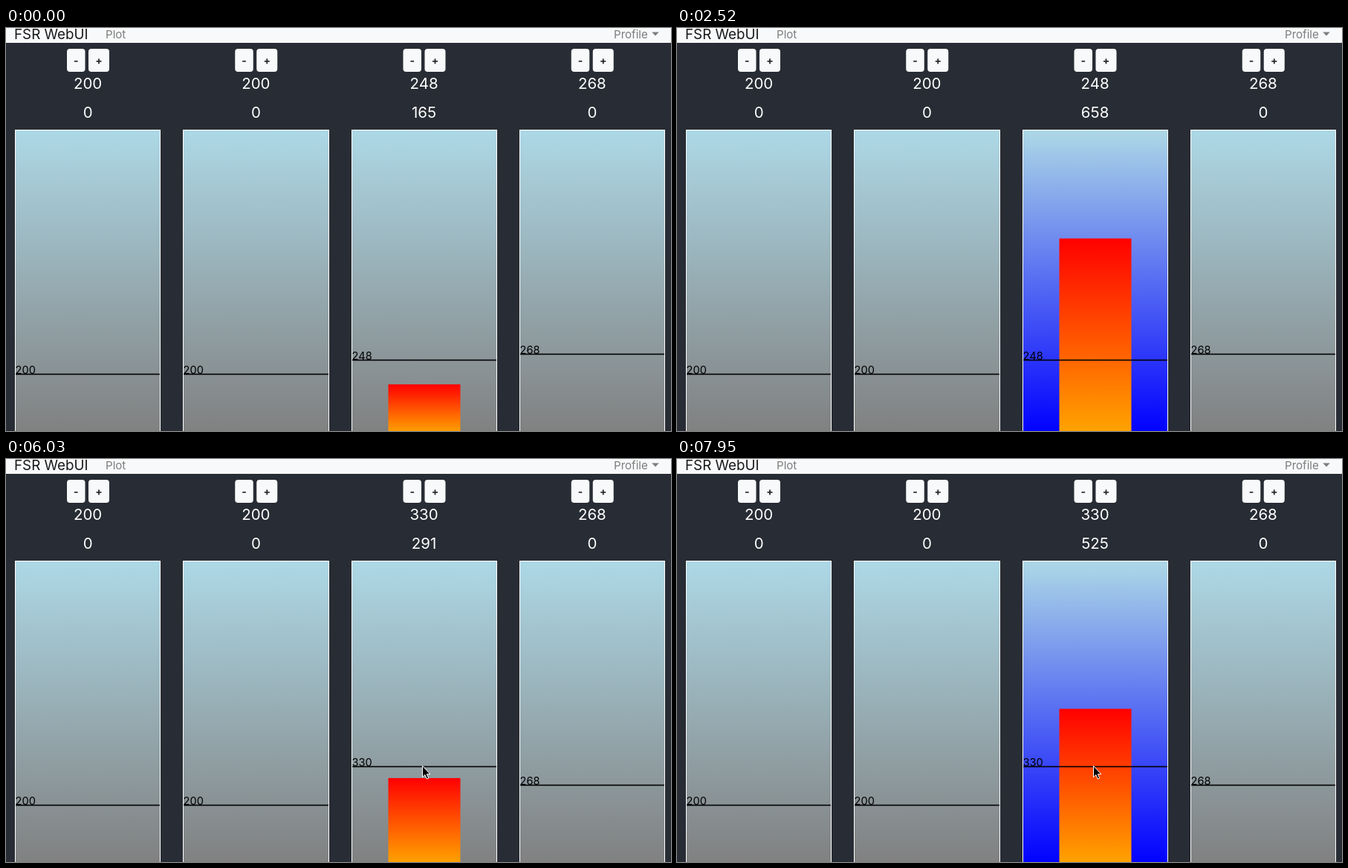
An HTML page for the animation above (8000 ms loop, 895 by 543 pixels).

```html
<!DOCTYPE html>
<html lang="en">
<head>
<meta charset="utf-8">
<title>FSR WebUI</title>
<style>
  html, body { margin: 0; width: 100%; height: 100%; overflow: hidden; background: #282c34; }
  svg { display: block; width: 895px; height: 543px; font-family: Inter, "Open Sans", sans-serif; }
  .number { font-size: 20.5px; fill: #fff; text-anchor: middle; }
  .label { font-size: 14.6px; fill: #000; }
  .sign { font-size: 14px; font-weight: 700; fill: #212529; text-anchor: middle; }
  .link { font-size: 15.1px; fill: #7c7d7d; }
  .brand { font-size: 18.8px; fill: #19191a; }
</style>
</head>
<body>
<svg id="stage" viewBox="0 0 895 543">
  <defs>
    <linearGradient id="idle" gradientUnits="userSpaceOnUse" x1="0" y1="138" x2="0" y2="546">
      <stop stop-color="lightblue"/><stop offset="1" stop-color="gray"/>
    </linearGradient>
    <linearGradient id="pressed" gradientUnits="userSpaceOnUse" x1="0" y1="138" x2="0" y2="546">
      <stop stop-color="lightblue"/><stop offset="1" stop-color="blue"/>
    </linearGradient>
    <linearGradient id="heat" x1="0" y1="0" x2="0" y2="1">
      <stop stop-color="red"/><stop offset="1" stop-color="orange"/>
    </linearGradient>
  </defs>
  <rect width="895" height="543" fill="#282c34"/>
  <rect width="895" height="20" fill="#f8f9fa"/>
  <text class="brand" x="11" y="14.6">FSR WebUI</text>
  <text class="link" x="134" y="14">Plot</text>
  <text class="link" x="818" y="14">Profile</text>
  <path d="M869.2 5.6h9.6l-4.8 4.8z" fill="#7c7d7d"/>
</svg>
<script>
const LOOP = 8000;
const TICK = 68;
const FLOOR = 546;
const UNIT = 408 / 1023;
const RELEASE = 3664, LIFTED = 3936, RETURN = 5350;
const stage = document.getElementById('stage');

// The picture refreshes once per tick while pressing, pointing, pressing again
const activity = [[60, LIFTED], [4100, 4712], [RETURN, LOOP]];

function hold(t) {
  const run = activity.findLast(([start]) => start <= t);
  if (!run) return 0;
  const [start, end] = run;
  return start + Math.floor((Math.min(t, end) - start) / TICK) * TICK;
}

// Repeated presses on top of a resting weight
function presses(t, rest, gain, period, power = 1) {
  return rest + gain * Math.abs(Math.sin(Math.PI * t / period)) ** power;
}

function pressure(t) {
  if (t <= RELEASE) return presses(t, 165, 507, 732.85, .925);
  if (t < RETURN) return Math.max(0, 166 * (LIFTED - t) / (LIFTED - RELEASE));
  return presses(t - RETURN, 155.93, 396.9, 764.5);
}

function glide(t, start, end, from, to) {
  const u = Math.min(1, Math.max(0, (t - start) / (end - start)));
  const eased = 1 - (1 - u) ** 2;
  return from.map((a, i) => a + (to[i] - a) * eased);
}

function pointerAt(t) {
  const rest = [639, 224];
  return t < 4100
    ? glide(t, 3800, LIFTED, [827, 0], rest)
    : glide(t, 4032, 4712, rest, [560.5, 413.5]);
}

function set(el, attrs) {
  for (const name in attrs) el.setAttribute(name, attrs[name]);
}

function add(tag, attrs, text = '') {
  const el = document.createElementNS(stage.namespaceURI, tag);
  set(el, attrs);
  el.textContent = text;
  return stage.appendChild(el);
}

function button(x, width, sign) {
  add('rect', { x, y: 28, width, height: 31, rx: 4, fill: '#f8f9fa' });
  add('text', { class: 'sign', x: x + width / 2, y: 49 }, sign);
}

function makeSensor(index) {
  const x = 12 + 226.25 * index;
  const left = Math.round(x), right = Math.round(x + 196.25);
  const mid = x + 98.1;
  button(x + 70, 24.5, '-');
  button(x + 99, 28, '+');
  const limitText = add('text', { class: 'number', x: mid, y: 82.3 });
  const valueText = add('text', { class: 'number', x: mid, y: 121.3 });
  const panel = add('rect', {
    x: left + .5, y: 137.5, width: right - left - 1, height: 410, stroke: '#fff'
  });
  const bar = add('rect', { x: left + 49.5, width: 97, fill: 'url(#heat)' });
  const line = add('rect', { x: left + 1, width: right - left - 2, height: 1.6, fill: '#000' });
  const label = add('text', { class: 'label', x: left + .6 });

  return (value, limit) => {
    const y = Math.round(FLOOR - limit * UNIT);
    limitText.textContent = label.textContent = limit;
    valueText.textContent = value;
    set(panel, { fill: value >= limit ? 'url(#pressed)' : 'url(#idle)' });
    set(bar, { y: FLOOR - value * UNIT, height: value * UNIT });
    set(line, { y: y - .3 });
    set(label, { y: y - .2 });
  };
}

const sensors = [0, 1, 2, 3].map(makeSensor);
sensors[0](0, 200);
sensors[1](0, 200);
sensors[3](0, 268);

const pointer = add('path', {
  d: 'M0 0V15.2L3.4 12 5.8 17.6 8.2 16.6 5.8 11.2H10.4Z',
  fill: '#000', stroke: '#fff', 'stroke-width': 1
});

function draw(t) {
  const held = hold(t);
  sensors[2](Math.round(pressure(held)), held < RETURN ? 248 : 330);
  set(pointer, {
    visibility: held < 3800 ? 'hidden' : 'visible',
    transform: `translate(${pointerAt(held)})`
  });
}

const began = performance.now();
function frame() {
  draw((performance.now() - began) % LOOP);
  requestAnimationFrame(frame);
}
frame();
</script>
</body>
</html>
```
